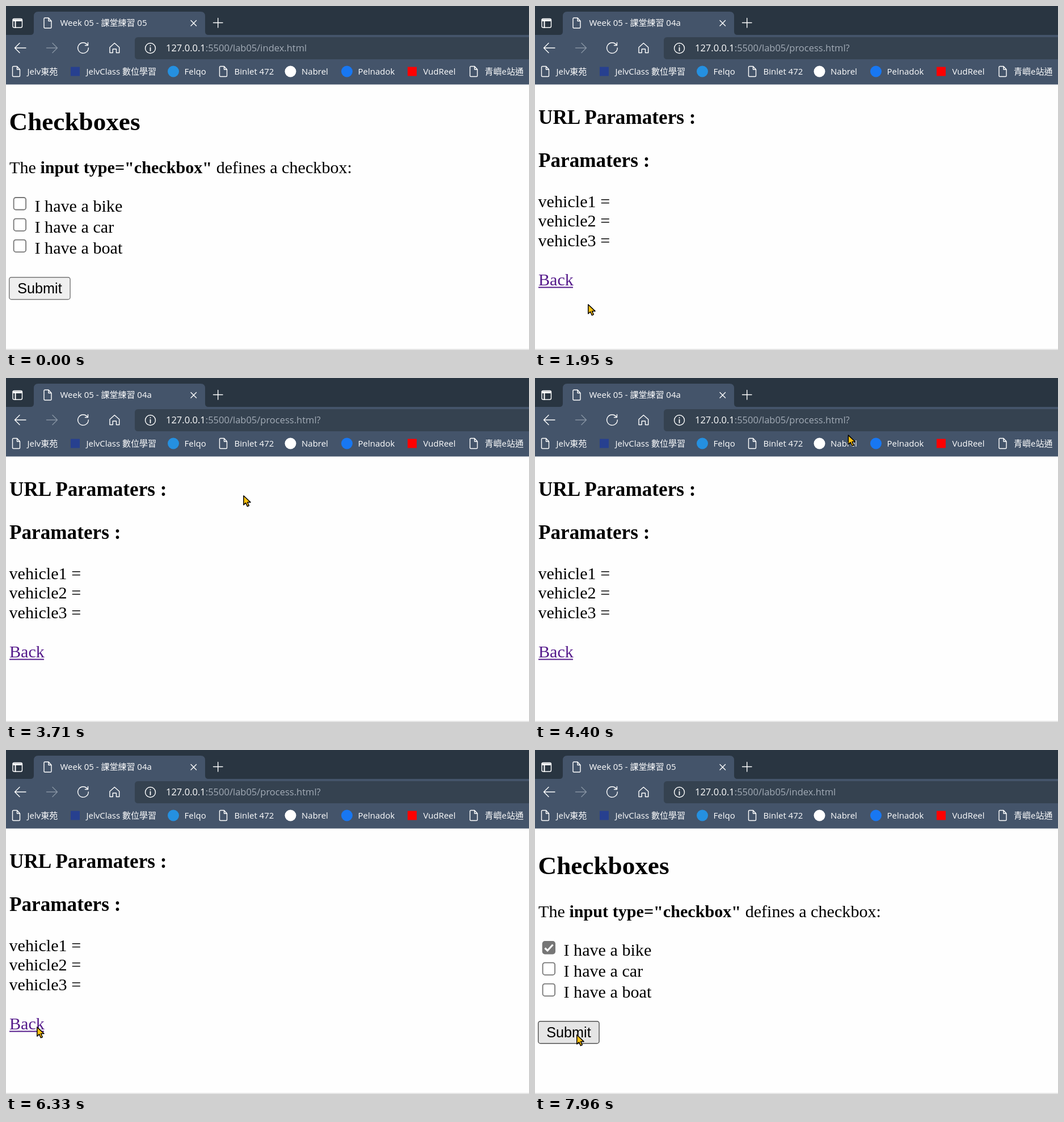
Recreate the animation shown at these times as an HTML page. Size 922 px wide and 607 px high, loop 8 s.

```html
<!DOCTYPE html>
<html lang="zh-Hant">
<head>
<meta charset="utf-8">
<title>Checkbox form</title>
<style>
  html, body { margin: 0; width: 100%; height: 100%; overflow: hidden; background: #fefefe; }
  svg { display: block; width: 100%; height: 100%; }
  text { white-space: pre; }
  .ui { font: 15px "Open Sans", "Noto Sans CJK TC", "Noto Sans CJK", sans-serif; fill: #fff; }
  .url { font-size: 16.5px; }
  .dim { fill: #a3acb7; }
  .page { font: 30.15px "Liberation Serif", "Times New Roman", serif; fill: #000; }
  .h2 { font-size: 45.2px; font-weight: bold; }
  .h3 { font-size: 35.2px; font-weight: bold; }
  .b { font-weight: bold; }
  .btn { font: 25.2px "Liberation Sans", Arial, sans-serif; text-anchor: middle; }
  .line { fill: none; stroke: #fff; stroke-width: 1.4; stroke-linecap: round; stroke-linejoin: round; }
</style>
</head>
<body>
<svg viewBox="0 0 922 607" preserveAspectRatio="none">
  <defs>
    <path id="doc" class="line" d="M2.500 1H9L14 6.500V17.500Q14 19 12.500 19H2.500Q1 19 1 17.500V2.500Q1 1 2.500 1M9 1V6.500H14"/>
  </defs>
  <rect width="922" height="607" fill="#fefefe"/>
  <rect width="922" height="52" fill="#293541"/>
  <path d="M0 51H43Q49 51 49 45V18Q49 10 57 10H343Q351 10 351 18V45Q351 51 357 51H922V138.500H0Z" fill="#44546a"/>
  <path d="M922 55H233Q227 55 227 61V88Q227 94 233 94H922Z" fill="#354250"/>
  <rect y="605.500" width="922" height="1" fill="#cfcfcf"/>

  <g class="line">
    <rect x="12" y="22.500" width="16.500" height="15.500" rx="2.500"/>
    <path d="M12.500 24.500H28M13 26H28M16.500 26V38" stroke-width="2"/>
    <path d="M326 25.500L335.500 35M335.500 25.500L326 35M365.500 29.500H382M373.700 21.500V38"/>
    <path d="M35 74H16M24 65.500L15.500 74L24 82.500"/>
    <path d="M71.500 74H90M82 65.500L90.500 74L82 82.500" stroke="#8793a3"/>
    <path d="M143.500 68.500A9.300 9.300 0 1 0 145.300 74M144.500 64.500V69.500H139.500"/>
    <path d="M183 73L191.300 65.500L199.700 73V82.500H194.500V76H188.200V82.500H183Z"/>
    <circle cx="254.500" cy="74.500" r="9"/>
    <path d="M254.500 73.500V79M254.500 70V70.200" stroke-width="1.800"/>
  </g>
  <use href="#doc" x="66" y="20"/>
  <text id="tab" class="ui" x="95.500" y="35"></text>
  <text class="ui url" x="282" y="80">127.0.0.1<tspan id="path" class="dim"></tspan></text>
  <g id="marks" class="ui"></g>

  <g id="form" class="page">
    <text class="h2" x="5.500" y="218.500">Checkboxes</text>
    <text x="6" y="295">The <tspan class="b">input type="checkbox"</tspan> defines a checkbox:</text>
    <g id="rows"></g>
    <rect id="btn" x="5.700" y="478.700" width="107.400" height="39" rx="3.800" stroke-width="1.400"/>
    <text class="btn" x="59.500" y="507">Submit</text>
  </g>

  <g id="result" class="page">
    <text class="h3" x="6" y="207.500">URL Paramaters :</text>
    <text class="h3" x="6" y="283.500">Paramaters :</text>
    <g id="params"></g>
    <text x="6" y="492.500" fill="#551a8b">Back</text>
    <rect x="6" y="495.500" width="61" height="2" fill="#551a8b"/>
  </g>

  <path id="cursor" d="M.8 .8V17L4.600 13.500L7.400 19.700L10.300 18.400L7.600 12.400H13Z"
    fill="#ffc20e" stroke="#000" stroke-width="1.500" stroke-linejoin="round"/>
</svg>
<script>
const LOOP = 8000, TICK = 67.6, FIRST = 375;
const ROW_TOP = 332.5, ROW = 37.3;
const $ = id => document.getElementById(id);

function add(parent, tag, attrs, text) {
  const el = document.createElementNS("http://www.w3.org/2000/svg", tag);
  for (const k in attrs) el.setAttribute(k, attrs[k]);
  if (text) el.textContent = text;
  return parent.appendChild(el);
}

// label, text x, icon colour (a page icon without one), square or round
const bookmarks = [
  ["Jelv東苑", 37.5],
  ["JelvClass 數位學習", 141.5, "#27408f", "square"],
  ["Felqo", 314.5, "#2590e0"],
  ["Binlet 472", 402.5],
  ["Nabrel", 521, "#fff"],
  ["Pelnadok", 620.5, "#1877f2"],
  ["VudReel", 735.5, "#f00", "square"],
  ["青嶼e站通", 844]
];
for (const [label, x, fill, shape] of bookmarks) {
  const r = shape ? 8 : 10, cx = x - 19.5, cy = 115.5;
  if (!fill) add($("marks"), "use", { href: "#doc", x: cx - 7.5, y: cy - 10 });
  else add($("marks"), "rect", { x: cx - r, y: cy - r, width: 2 * r, height: 2 * r, rx: shape ? 0 : r, fill });
  add($("marks"), "text", { x, y: 120.5 }, label);
}

for (let i = 0; i < 3; i++) {
  add($("params"), "text", { x: 5.5, y: 354.5 + i * 34.5 }, `vehicle${i + 1} =`);
}

const boxes = ["bike", "car", "boat"].map((word, i) => {
  const y = ROW_TOP + i * ROW;
  add($("rows"), "text", { x: 50.5, y: y + 30 }, "I have a " + word);
  return add($("rows"), "rect", { x: 13.6, y: y + 5.5, width: 21.5, height: 21.5, rx: 3.8, "stroke-width": 1.8 });
});
const tick = add($("rows"), "path", {
  d: "M17.5 349.5L22 354L31.500 343.500", fill: "none", stroke: "#fff", "stroke-width": 3.2
});

// where the pointer turns or rests: time, x, y
const stops = [
  [395, 497, 598], [1138, 100, 519], [1409, 80, 505], [1500, 80, 505],
  [1950, 93, 526], [2100, 93, 526], [2896, 159, 352], [3707, 418, 207],
  [4480, 555, 97], [5130, 555, 97], [5397, 511, 418], [6000, 70, 494],
  [6340, 54, 488], [6480, 66, 531], [6817, 109, 370],
  [7290, 18, 340], [7470, 18, 340], [7966, 73, 502]
];

const slope = (i, axis) => (stops[i + 1][axis] - stops[i][axis]) / (stops[i + 1][0] - stops[i][0]);

// speed at a stop: zero at a rest or reversal, else the harmonic mean of both sides
function speed(i, axis) {
  if (i === 0) return slope(0, axis);
  if (i === stops.length - 1) return slope(i - 1, axis);
  const a = slope(i - 1, axis), b = slope(i, axis);
  return a * b > 0 ? 2 * a * b / (a + b) : 0;
}

// monotone cubic through the stops
function pointer(t) {
  if (t < stops[0][0]) return [-99, -99];
  const next = stops.findIndex(s => s[0] > t);
  if (next < 0) return stops[stops.length - 1].slice(1);
  const i = next - 1, span = stops[next][0] - stops[i][0];
  const f = (t - stops[i][0]) / span, g = 1 - f;
  return [1, 2].map(axis =>
    g * g * ((1 + 2 * f) * stops[i][axis] + f * span * speed(i, axis)) +
    f * f * ((1 + 2 * g) * stops[next][axis] - g * span * speed(next, axis)));
}

function paint(el, fill, stroke) {
  el.setAttribute("fill", fill);
  el.setAttribute("stroke", stroke);
}

function draw(ms) {
  // the screen is sampled in ticks
  const t = FIRST + 20 + Math.floor((ms - FIRST) / TICK) * TICK;
  const [x, y] = pointer(t);
  const sent = t >= 1600 && t < 6390, checked = t >= 7400;

  $("form").style.display = sent ? "none" : "";
  $("result").style.display = sent ? "" : "none";
  $("tab").textContent = "Week 05 - 課堂練習 " + (sent ? "04a" : "05");
  $("path").textContent = ":5500/lab05/" + (sent ? "process.html?" : "index.html");

  const hot = x > 12 && x < 206 ? Math.floor((y - ROW_TOP) / ROW) : -1;
  boxes.forEach((box, i) => {
    const edge = i === hot ? "#4f4f4f" : "#767676";
    paint(box, i === 0 && checked ? edge : "#fff", edge);
  });
  tick.style.display = checked ? "" : "none";

  const over = x > 5 && x < 114 && y > 478 && y < 518;
  const down = t >= 1530 && t < 1600;
  if (down) paint($("btn"), "#f5f5f5", "#8d8d8d");
  else if (over) paint($("btn"), "#e5e5e5", "#4f4f4f");
  else paint($("btn"), "#efefef", "#767676");
  $("cursor").setAttribute("transform", `translate(${x.toFixed(1)} ${y.toFixed(1)})`);
}

const start = performance.now();
function loop() {
  draw((performance.now() - start) % LOOP);
  requestAnimationFrame(loop);
}
loop();
</script>
</body>
</html>
```
